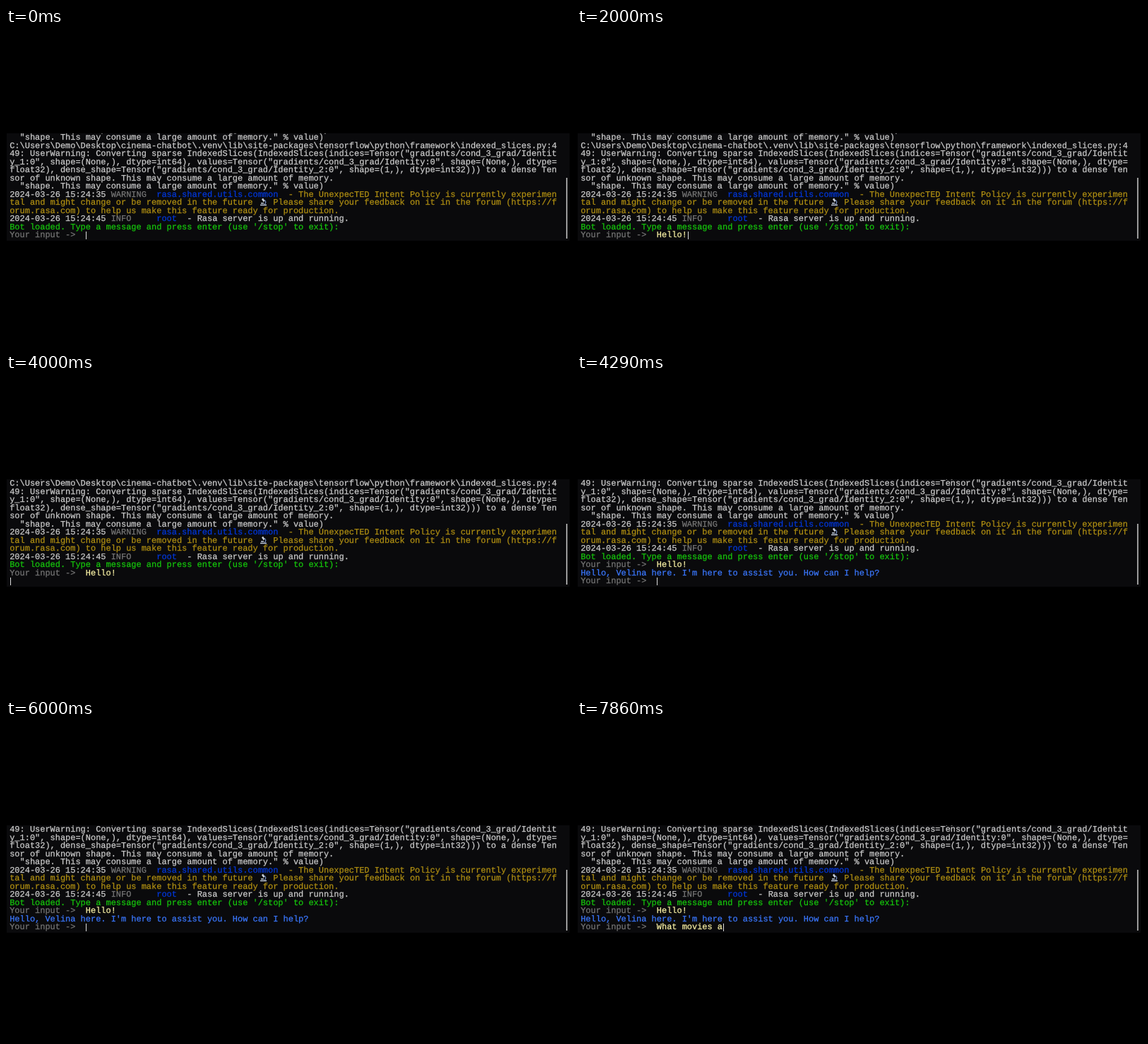
These frames come from a looping animation (800 by 450 pixels, 8 s). An HTML page:

```html
<!DOCTYPE html>
<html lang="en">
<head>
<meta charset="utf-8">
<title>Terminal chat</title>
<style>
html, body { margin: 0; width: 100%; height: 100%; overflow: hidden; background: #000; }
#term {
  position: absolute; left: 1px; top: 149px; width: 797px; height: 152px;
  overflow: hidden; background: #0a0a0c; color: #ccc;
  font: 11.967px/11.5px "Liberation Mono", monospace;
  -webkit-text-stroke: .25px;
  text-rendering: geometricPrecision;
}
pre { position: absolute; left: 4.2px; bottom: 1.5px; margin: 0; font: inherit; }
.gray { color: #767676; }
.blue { color: #0037da; }
.gold { color: #b08f12; }
.green { color: #16c60c; }
.typed { color: #f9f1a5; }
.reply { color: #3b78ff; }
.icon { position: relative; }
.icon svg { position: absolute; left: 1px; top: 0; }
#cursor { position: absolute; top: 139px; width: 1px; height: 11px; background: #ddd; }
#bar { position: absolute; left: 792px; top: 63px; width: 2px; height: 86px; background: #9a9a9a; }
</style>
</head>
<body>
<div id="term">
<pre>
sor of unknown shape. This may consume a large amount of memory.
  "shape. This may consume a large amount of memory." % value)
C:\Users\Demo\Desktop\cinema-chatbot\.venv\lib\site-packages\tensorflow\python\framework\indexed_slices.py:4
49: UserWarning: Converting sparse IndexedSlices(IndexedSlices(indices=Tensor("gradients/cond_3_grad/Identit
y_1:0", shape=(None,), dtype=int64), values=Tensor("gradients/cond_3_grad/Identity:0", shape=(None,), dtype=
float32), dense_shape=Tensor("gradients/cond_3_grad/Identity_2:0", shape=(1,), dtype=int32))) to a dense Ten
sor of unknown shape. This may consume a large amount of memory.
  "shape. This may consume a large amount of memory." % value)
2024-03-26 15:24:35 <span class="gray">WARNING</span>  <span class="blue">rasa.shared.utils.common</span>  <span class="gold">- The UnexpecTED Intent Policy is currently experimen
tal and might change or be removed in the future <span class="icon">  <svg width="13" height="12" viewBox="0 0 13 12" fill="none"><path d="M5 1.500l2.500 4" stroke="#ccd3dc" stroke-width="2.400"/><path d="M8 3.500q3.500 3 0 6" stroke="#6f86b4" stroke-width="1.400"/><path d="M3 8h4M2 10.500h9" stroke="#c4cede" stroke-width="1.300"/></svg></span> Please share your feedback on it in the forum (https://f
orum.rasa.com) to help us make this feature ready for production.</span>
2024-03-26 15:24:45 <span class="gray">INFO</span>     <span class="blue">root</span>  - Rasa server is up and running.
<span class="green">Bot loaded. Type a message and press enter (use '/stop' to exit):</span>
<span id="chat"></span></pre>
<div id="cursor"></div>
<div id="bar"></div>
</div>
<script>
const LOOP = 8000, SEND = 2140, ANSWER = 4290, CELL = 7.182, PROMPT = 15;
const hello = "Hello!", question = "What movies a";
const reply = "Hello, Velina here. I'm here to assist you. How can I help?";
// moment each character is typed
const helloKeys = [570, 860, 1000, 1140, 1290, 1710];
const questionKeys = [6140, 6430, 6570, 6710, 7000, 7140, 7290, 7290, 7430, 7570, 7710, 7710, 7860];

const chat = document.getElementById("chat");
const cursor = document.getElementById("cursor");

const typed = (text, keys, t) => text.slice(0, keys.filter(k => k <= t).length);
const prompt = text =>
  `<span class="gray">Your input -&gt;</span>  <span class="typed">${text}</span>`;

let shown;
function draw(t) {
  const first = typed(hello, helloKeys, t);
  const second = typed(question, questionKeys, t);
  let html = prompt(first), col = PROMPT + first.length;
  if (t >= ANSWER) {
    html += `\n<span class="reply">${reply}</span>\n` + prompt(second);
    col = PROMPT + second.length;
  } else if (t >= SEND) {
    html += "\n ";
    col = 0;
  }
  if (html !== shown) chat.innerHTML = shown = html;
  cursor.style.left = 4.7 + col * CELL + "px";
}

const start = performance.now();
function tick() {
  draw((performance.now() - start) % LOOP);
  requestAnimationFrame(tick);
}
tick();
</script>
</body>
</html>
```
